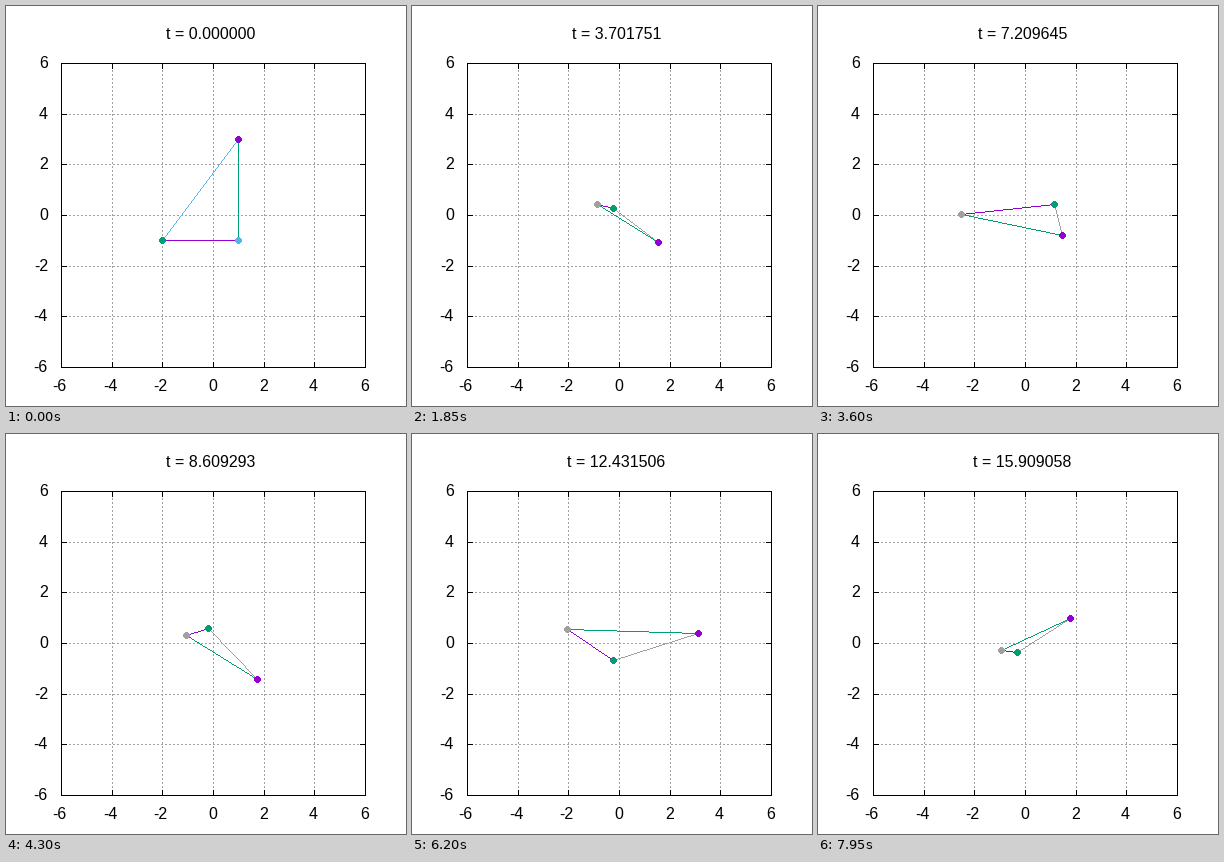
Write a matplotlib script that moves like this. It is 400 px wide and 400 px high and loops after 8000 ms.

```python
import matplotlib.pyplot as plt
import numpy as np
from matplotlib.animation import FuncAnimation
from matplotlib.colors import to_rgb
from matplotlib.transforms import IdentityTransform

SIZE, DPI = 400, 100
FRAMES, INTERVAL = 160, 50
LEFT, TOP, SIDE, LIMIT = 55, 57, 304, 6
RIGHT, BOTTOM = LEFT + SIDE, TOP + SIDE
TICK, RADIUS_SQ = 5, 10

PURPLE, GREEN, BLUE, GRAY = "#9400d3", "#009e73", "#56b4e9", "#a0a0a0"
FIRST_COLORS = (PURPLE, GREEN, BLUE)
LATER_COLORS = (PURPLE, GRAY, GREEN)

MASSES = (3.0, 4.0, 5.0)
START = (1 + 3j, -2 - 1j, 1 - 1j)
EDGES = ((1, 2), (2, 0), (0, 1))

# The clock runs close to 0.1 per frame, with a small overshoot.
KEY_FRAMES = (0, 15, 37, 72, 100, 124, 159)
KEY_TIMES = (0, 1.507516, 3.701751, 7.209645, 10.008940, 12.431506, 15.909058)
TIMES = np.interp(np.arange(FRAMES), KEY_FRAMES, KEY_TIMES)


def derivative(state):
    """Velocities and gravitational accelerations of the three bodies."""
    a, b, c, va, vb, vc = state
    ma, mb, mc = MASSES
    ab, bc, ca = b - a, c - b, a - c
    fab, fbc, fca = ab / abs(ab) ** 3, bc / abs(bc) ** 3, ca / abs(ca) ** 3
    return (va, vb, vc,
            mb * fab - mc * fca,
            mc * fbc - ma * fab,
            ma * fca - mb * fbc)


def shift(state, slope, h):
    return [s + h * k for s, k in zip(state, slope)]


def rk4(state, h):
    k1 = derivative(state)
    k2 = derivative(shift(state, k1, h / 2))
    k3 = derivative(shift(state, k2, h / 2))
    k4 = derivative(shift(state, k3, h))
    return [s + h / 6 * (p + 2 * q + 2 * r + w)
            for s, p, q, r, w in zip(state, k1, k2, k3, k4)]


def simulate(times, eta=0.004):
    """Positions at the given times; steps shrink during close encounters."""
    state, t, path = [*START, 0j, 0j, 0j], 0.0, []
    for goal in times:
        while goal - t > 1e-13:
            a, b, c = state[:3]
            near = min(abs(a - b), abs(b - c), abs(c - a))
            h = min(eta * near ** 1.5, goal - t)
            state = rk4(state, h)
            t += h
        path.append(state[:3])
    return path


def px(v):
    return round(LEFT + (v + LIMIT) * SIDE / (2 * LIMIT))


def py(v):
    return round(TOP + (LIMIT - v) * SIDE / (2 * LIMIT))


def rgb(color):
    return [round(255 * c) for c in to_rgb(color)]


def line(canvas, start, end, color, dotted=False):
    """One pixel wide, without smoothing."""
    (xa, ya), (xb, yb) = start, end
    steps = max(abs(xb - xa), abs(yb - ya))
    xs = np.rint(np.linspace(xa, xb, steps + 1)).astype(int)
    ys = np.rint(np.linspace(ya, yb, steps + 1)).astype(int)
    keep = np.arange(steps + 1) % 4 < (2 if dotted else 4)
    canvas[ys[keep], xs[keep]] = rgb(color)


def dot(canvas, center, color):
    rows, cols = np.ogrid[:SIZE, :SIZE]
    x, y = center
    canvas[(cols - x) ** 2 + (rows - y) ** 2 <= RADIUS_SQ] = rgb(color)


def label(x, y, text="", ha="center"):
    return fig.text(x, SIZE - y, text, ha=ha, va="baseline",
                    transform=IdentityTransform())


def draw_axes(canvas):
    marks = [(v, px(v), py(v)) for v in range(-LIMIT, LIMIT + 1, 2)]
    inner = marks[1:-1]
    for _, x, y in inner:
        line(canvas, (x, BOTTOM), (x, TOP), GRAY, dotted=True)
        line(canvas, (LEFT, y), (RIGHT, y), GRAY, dotted=True)
    for _, x, y in inner:
        line(canvas, (x, TOP), (x, TOP + TICK), "black")
        line(canvas, (x, BOTTOM), (x, BOTTOM - TICK), "black")
        line(canvas, (LEFT, y), (LEFT + TICK, y), "black")
        line(canvas, (RIGHT, y), (RIGHT - TICK, y), "black")
    corners = [(LEFT, TOP), (RIGHT, TOP), (RIGHT, BOTTOM), (LEFT, BOTTOM)]
    for start, end in zip(corners, corners[1:] + corners[:1]):
        line(canvas, start, end, "black")
    for v, x, y in marks:
        label(x - (2 if v < 0 else 0.5), 385, str(v))
        label(42, y + 5, str(v), ha="right")


PATH = simulate(TIMES)

plt.rcParams["font.family"] = "Liberation Sans"
plt.rcParams["font.size"] = 16 * 72 / DPI
fig = plt.figure(figsize=(SIZE / DPI, SIZE / DPI), dpi=DPI, facecolor="white")

base = np.full((SIZE, SIZE, 3), 255, dtype=np.uint8)
draw_axes(base)
picture = fig.figimage(base, origin="upper")
title = label(204.3, 33)


def draw(frame):
    colors = LATER_COLORS if frame else FIRST_COLORS
    points = [(px(p.real), py(p.imag)) for p in PATH[frame]]
    canvas = base.copy()
    for (i, j), color in zip(EDGES, colors):
        line(canvas, points[i], points[j], color)
    for point, color in reversed(list(zip(points, colors))):
        dot(canvas, point, color)
    picture.set_data(canvas)
    title.set_text(f"t = {TIMES[frame]:.6f}")
    return [picture, title]


anim = FuncAnimation(fig, draw, frames=FRAMES, interval=INTERVAL,
                     repeat=True, repeat_delay=0, blit=False)
plt.show()
```
